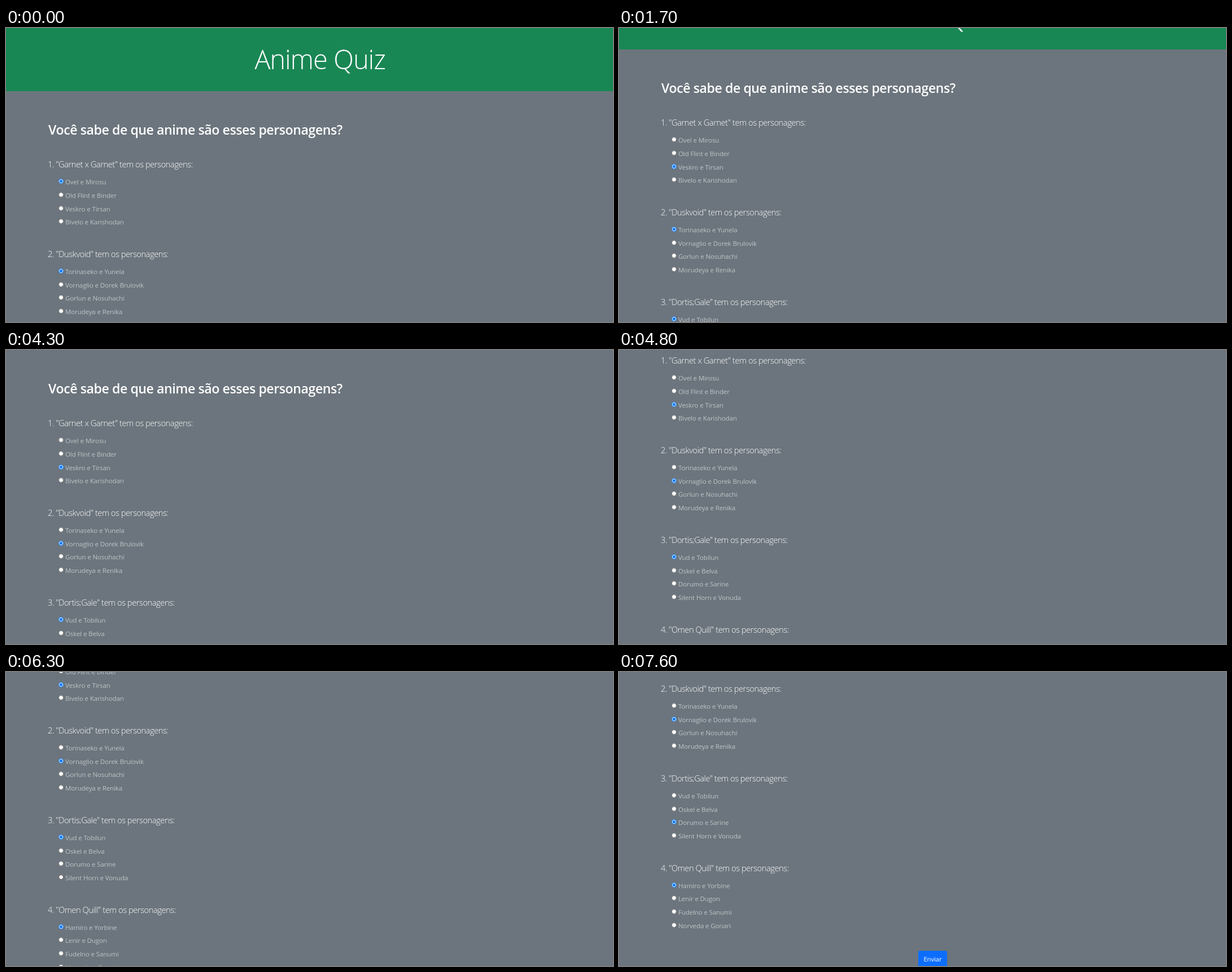
Write an HTML page that moves like this. It is 1075 px wide and 521 px high and loops after 8000 ms.

```html
<!DOCTYPE html>
<html lang="pt-BR">
<head>
<meta charset="utf-8">
<title>Anime Quiz</title>
<style>
  :root {
    --off: #767676;
    --hover: #4f4f4f;
    --press: #8d8d8d;
    --on: #0075ff;
    --on-hover: #005cc8;
  }
  html, body {
    margin: 0;
    width: 100%;
    height: 100%;
    overflow: hidden;
    background: #6c757d;
  }
  body {
    position: relative;
    color: #fff;
    font-family: "Open Sans", "Noto Sans", sans-serif;
    white-space: nowrap;
  }
  #page {
    position: absolute;
    inset: 0 0 auto;
    height: 920px;
    animation: scroll 8s step-end infinite;
  }
  header {
    height: 112px;
    background: #198754;
  }
  h1, h2, h3, .row, .radio, .send { position: absolute; margin: 0; }
  h1 {
    left: 56px;
    width: 1000px;
    top: 25px;
    text-align: center;
    font-size: 47px;
    line-height: 60px;
    font-weight: 300;
    letter-spacing: -.022em;
  }
  h2 {
    left: 75px;
    top: 165px;
    font-size: 23px;
    line-height: 30px;
    font-weight: 600;
    letter-spacing: -.016em;
  }
  .question { position: absolute; left: 74px; }
  h3 {
    font-size: 14.7px;
    line-height: 20px;
    font-weight: 300;
    letter-spacing: -.031em;
  }
  .row {
    left: 31px;
    color: rgba(255, 255, 255, .57);
    font-size: 11.5px;
    line-height: 20px;
    letter-spacing: -.01em;
  }
  .radio {
    left: -12px;
    top: 4px;
    box-sizing: border-box;
    width: 9px;
    height: 9px;
    border: 1px solid var(--off);
    border-radius: 50%;
    background: #fff;
    color: #fff;
    animation: 8s step-end infinite;
  }
  .radio::after {
    content: "";
    position: absolute;
    inset: 1px;
    border-radius: 50%;
    background: currentColor;
  }
  .radio.on { border-color: var(--on); color: var(--on); }
  .send {
    left: 530px;
    top: 865px;
    width: 51px;
    height: 30px;
    border-radius: 3px;
    background: #0d6efd;
    font-size: 11.4px;
    line-height: 30px;
    letter-spacing: -.01em;
    text-align: center;
  }

  @keyframes scroll {
    0% { transform: none; }
    18.75% { transform: translateY(-4px); }
    20% { transform: translateY(-60px); }
    21.25% { transform: translateY(-74px); }
    53.75% { transform: translateY(-112px); }
    55% { transform: translateY(-148px); }
    58.75% { transform: translateY(-199px); }
    60% { transform: translateY(-223px); }
    65% { transform: translateY(-260px); }
    66.25% { transform: translateY(-297px); }
    92.5% { transform: translateY(-301px); }
    93.75% { transform: translateY(-359px); }
    95%, 100% { transform: translateY(-371px); }
  }

  /* radio-<question>-<row>: border is the ring, color is the dot */
  @keyframes radio-1-1 {
    0% { border-color: var(--on); color: var(--on); }
    11.25%, 100% { border-color: var(--off); color: #fff; }
  }
  @keyframes radio-1-2 {
    0%, 7.5%, 100% { border-color: var(--off); }
    6.25% { border-color: var(--hover); }
  }
  @keyframes radio-1-3 {
    0% { border-color: var(--off); color: #fff; }
    7.5% { border-color: var(--hover); color: #fff; }
    11.25% { border-color: var(--on-hover); color: var(--on-hover); }
    15%, 100% { border-color: var(--on); color: var(--on); }
  }
  @keyframes radio-2-1 {
    0% { border-color: var(--on); color: var(--on); }
    48.75%, 100% { border-color: var(--off); color: #fff; }
  }
  @keyframes radio-2-2 {
    0% { border-color: var(--off); color: #fff; }
    43.75% { border-color: var(--hover); color: #fff; }
    47.5% { border-color: var(--press); color: #fff; }
    48.75% { border-color: var(--on-hover); color: var(--on-hover); }
    50%, 100% { border-color: var(--on); color: var(--on); }
  }
  @keyframes radio-3-1 {
    0% { border-color: var(--on); color: var(--on); }
    88.75%, 100% { border-color: var(--off); color: #fff; }
  }
  @keyframes radio-3-3 {
    0% { border-color: var(--off); color: #fff; }
    85% { border-color: var(--hover); color: #fff; }
    88.75% { border-color: var(--on-hover); color: var(--on-hover); }
    90%, 100% { border-color: var(--on); color: var(--on); }
  }
  @keyframes radio-3-4 {
    0%, 80%, 82.5%, 100% { border-color: var(--off); }
    78.75%, 81.25% { border-color: var(--hover); }
  }
</style>
</head>
<body>
<div id="page">
  <header></header>
  <h1>Anime Quiz</h1>
  <h2>Você sabe de que anime são esses personagens?</h2>
  <div class="send">Enviar</div>
</div>
<script>
  const quiz = [
    ["Garnet x Garnet", "Ovel e Mirosu", "Old Flint e Binder", "Veskro e Tirsan", "Bivelo e Karishodan"],
    ["Duskvoid", "Torinaseko e Yunela", "Vornaglio e Dorek Brulovik", "Gorlun e Nosuhachi", "Morudeya e Renika"],
    ["Dortis;Gale", "Vud e Tobilun", "Oskel e Belva", "Dorumo e Sarine", "Silent Horn e Vonuda"],
    ["Omen Quill", "Hamiro e Yorbine", "Lenir e Dugon", "Fudelno e Sanumi", "Norveda e Gonari"]
  ];
  const page = document.getElementById("page");

  function add(parent, tag, name, text, top) {
    const el = document.createElement(tag);
    el.className = name;
    el.textContent = text;
    if (top !== undefined) el.style.top = top + "px";
    return parent.appendChild(el);
  }

  quiz.forEach(([title, ...answers], q) => {
    const box = add(page, "div", "question", "", 231 + q * 158.9);
    add(box, "h3", "", `${q + 1}. "${title}" tem os personagens:`);
    answers.forEach((answer, i) => {
      const row = add(box, "div", "row", answer, 32 + i * 23.8);
      const radio = add(row, "span", i ? "radio" : "radio on", "");
      radio.style.animationName = `radio-${q + 1}-${i + 1}`;
    });
  });
</script>
</body>
</html>
```
